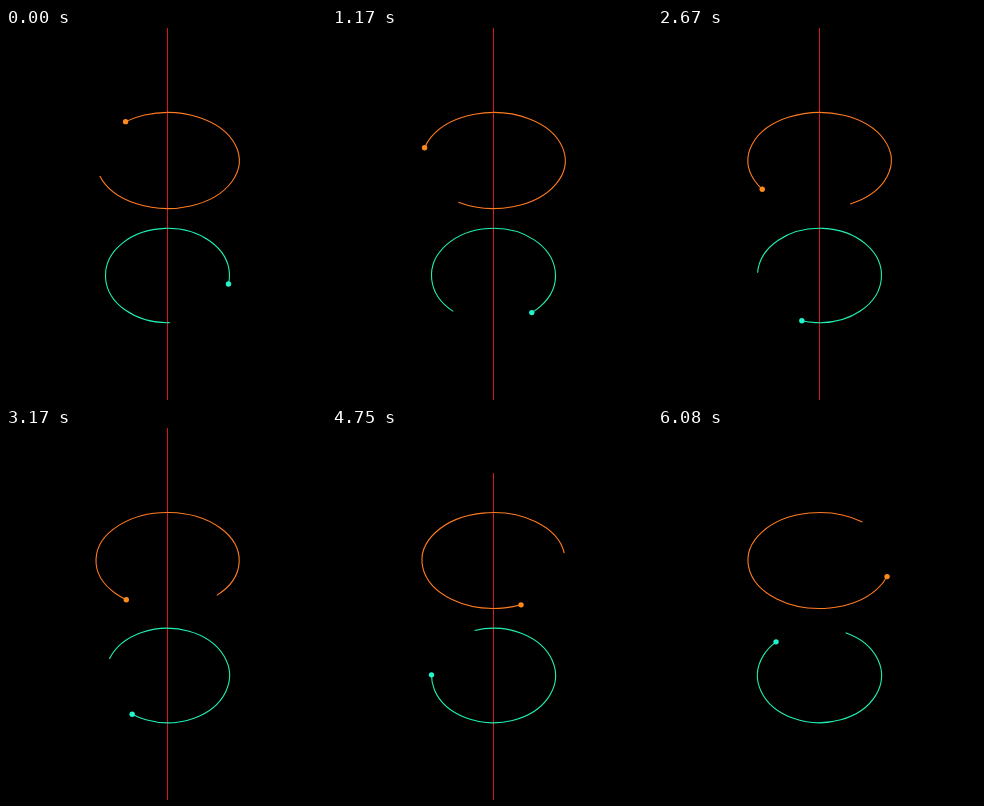
Animation of 320x372 px, one loop 6.16 s. Source, as an HTML page with a canvas:

```html
<!DOCTYPE html>
<html lang="en">
<head>
<meta charset="utf-8">
<title>Two orbits</title>
<style>
  html, body { margin: 0; width: 100%; height: 100%; overflow: hidden; background: #000; }
  canvas { display: block; }
</style>
</head>
<body>
<canvas id="stage" width="320" height="372"></canvas>
<script>
const ctx = document.getElementById('stage').getContext('2d');
const W = 320, H = 372, LOOP = 6160, FPS = 12;
const RAD = Math.PI / 180;
const STEP = 360 / 126;   // degrees of orbit per frame
const GAP = 74;           // open part of each trail, ahead of the dot
const TILT = 0.067;       // orbits run a little faster along the near (lower) side
const DOT = 2.7;

// Angles are measured from the bottom of the orbit; dir 1 is counter-clockwise.
const orbits = [
  { x: 161.6, y: 132.5, rx: 71.6, ry: 48, start: -141.7, dir: 1, line: '#ff7b22', dot: '#ff8a1c' },
  { x: 161.5, y: 247.5, rx: 62, ry: 47.2, start: 75.9, dir: -1, line: '#20efb4', dot: '#22f5cb' }
];

function canvasAngle(degrees) {
  const a = degrees * RAD;
  return Math.PI / 2 - (a + TILT * Math.sin(a));
}

function drawOrbit(o, frame) {
  const phase = o.start + o.dir * STEP * frame;
  const head = canvasAngle(phase);
  const tail = canvasAngle(phase + o.dir * GAP);

  ctx.strokeStyle = o.line;
  ctx.lineWidth = 1.1;
  ctx.beginPath();
  ctx.ellipse(o.x, o.y, o.rx, o.ry, 0, tail, head, o.dir > 0);
  ctx.stroke();

  ctx.fillStyle = o.dot;
  ctx.beginPath();
  ctx.arc(o.x + o.rx * Math.cos(head), o.y + o.ry * Math.sin(head), DOT, 0, 2 * Math.PI);
  ctx.fill();
}

// The axis stays whole, then its upper end drops out of the stage.
function drawAxis(frame) {
  const top = Math.max(0, Math.round(8 + (frame - 56) * 112 / 3));
  if (top >= H) return;
  ctx.fillStyle = '#d8141a';
  ctx.fillRect(161, top, 1, H - top);
}

function draw() {
  const time = performance.now() % LOOP;
  const frame = Math.min(73, Math.floor((time + 5) * FPS / 1000));
  ctx.fillStyle = '#000';
  ctx.fillRect(0, 0, W, H);
  drawAxis(frame);
  orbits.forEach(o => drawOrbit(o, frame));
  requestAnimationFrame(draw);
}

draw();
</script>
</body>
</html>
```
